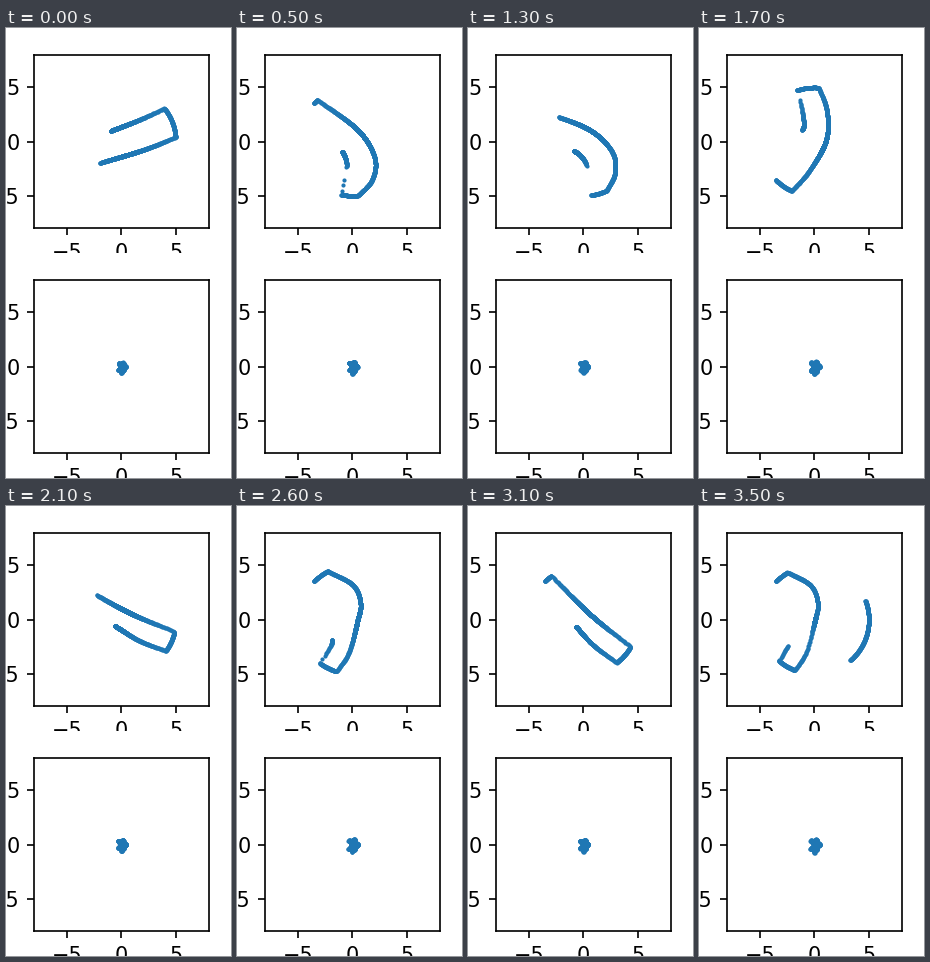
These frames come from a looping animation (225 by 450 pixels, 3.6 s). A matplotlib script:

```python
import numpy as np
import matplotlib.pyplot as plt
from matplotlib.animation import FuncAnimation

INTERVAL = 100
REACH, BLIND = 5.0, 0.077   # sensor range and dead zone
TURN = np.radians(16)       # left turn per frame
SPEED = 0.2                 # distance per frame
BEAMS = np.radians(np.linspace(-135, 135, 1080))


def wall(*keys):
    """Catmull-Rom curve through the key points, carried on straight at both ends."""
    p = np.array(keys, float)
    p = np.vstack([2 * p[0] - p[1], p, 2 * p[-1] - p[-2]])
    t = np.linspace(0, 1, 6, endpoint=False)[:, None]
    curve = [b + t / 2 * (c - a + t * (2*a - 5*b + 4*c - d + t * (3*b - 3*c + d - a)))
             for a, b, c, d in zip(p, p[1:], p[2:], p[3:])]

    def beyond(end, inner):
        step = end - inner
        return end + 6 * step / np.hypot(*step)

    return np.vstack([beyond(p[1], p[2]), *curve, p[-2], beyond(p[-2], p[-3])])


# Track walls around the car, which sits at the origin facing +x
SCENES = {
    "start": [wall((-1.03, .97), (1.8, 2.08), (4, 3.1)),
              wall((-1.9, -1.95), (2.1, -.73), (5, .42))],
    "bend": [wall((-3.15, 3.83), (.52, 1.06), (2.05, -1.5), (1.8, -3.55), (.52, -5)),
             wall((-1.6, -.3), (-.9, -.97), (-.52, -2.07), (-.74, -3.3))],
    "slant": [wall((-2.92, 4.02), (.7, .42), (4.38, -2.54)),
              wall((3.1, -4), (.9, -2.35), (-.64, -.68))],
    "across": [wall((1.63, 4.66), (.53, .15), (.22, -5.03)),
               wall((-1.22, 4.76), (-1.68, 1.62), (-2.4, -2.45), (-2.53, -4.35))],
    "right": [wall((.43, 4.95), (1.16, 2.8), (1.07, .1), (-.5, -2.75), (-2.1, -4.57)),
              wall((-1.9, 5), (-1.4, 4.05), (-1.02, 2.2), (-1.1, 1.1), (-2.4, -.2))],
    "left": [wall((-2.18, 4.44), (.06, 3.19), (.75, 1.5), (.47, -.1), (-.3, -3),
                  (-1.4, -4.75)),
             wall((-3, -4.05), (-2.35, -3.05), (-1.84, -1.84), (-2.6, -.9))],
}
SCENES["crash"] = [w - (.43, 0) for w in SCENES["left"]]

# Each run: number of frames, scene halfway, scene at the end
RUNS = [(10, "bend", "across"), (8, "bend", "right"),
        (9, "slant", "left"), (9, "slant", "crash")]
STEPS = [(k, run) for run in RUNS for k in range(run[0])]


def cross(a, b):
    return a[..., 0] * b[..., 1] - a[..., 1] * b[..., 0]


def polar(r, angle):
    return np.column_stack([r * np.cos(angle), r * np.sin(angle)])


def scan(name, step):
    """Beam end points seen from the car, `step` frames past the scene's origin."""
    heading = step * TURN
    pos = SPEED * step * np.array([np.cos(heading / 2), np.sin(heading / 2)])
    rays = polar(1, BEAMS + heading)[:, None]
    reach = np.full(len(BEAMS), REACH)
    for line in SCENES[name]:
        a, seg = line[:-1] - pos, np.diff(line, axis=0)
        den = cross(rays, seg)
        den = np.where(np.abs(den) < 1e-9, 1e-9, den)
        t, u = cross(a, seg) / den, cross(a, rays) / den
        hit = (t > BLIND) & (u >= 0) & (u <= 1)
        reach = np.minimum(reach, np.where(hit, t, REACH).min(axis=1))
    return polar(reach, BEAMS)


def blob(i, step):
    """Small lobed cloud with a spike straight down, growing through a run."""
    rng = np.random.default_rng(100 + i)
    angle = BEAMS[::2]
    edge = .4 + .1 * np.cos(5.4 * angle)
    edge += .38 * np.exp(-((angle + np.pi / 2) / .12) ** 2)
    r = edge * np.sqrt(rng.random(len(angle)))
    return polar(r * (.85 + .03 * step), angle)


def panel(sub):
    ax = sub.add_axes([.125, .11, .775, .77])
    ax.set(xlim=(-8, 8), ylim=(-8, 8), xticks=(-5, 0, 5), yticks=(-5, 0, 5))
    return ax.scatter([], [], s=1, color="C0")


fig = plt.figure(figsize=(1.5, 3), dpi=150, facecolor="white")
# The lower panel's white background hides the upper one's overhanging labels
top, bottom = [panel(s) for s in fig.subfigures(2, 1, hspace=0, facecolor="white")]


def update(i):
    k, (length, middle, end) = STEPS[i]
    stops = [(0, "start"), (length // 2, middle), (length - 1, end)]
    origin, name = min(stops, key=lambda s: abs(k - s[0]))
    top.set_offsets(scan(name, k - origin))
    bottom.set_offsets(blob(i, k))
    return top, bottom


anim = FuncAnimation(fig, update, frames=len(STEPS), interval=INTERVAL,
                     repeat=True, repeat_delay=0)
plt.show()
```
